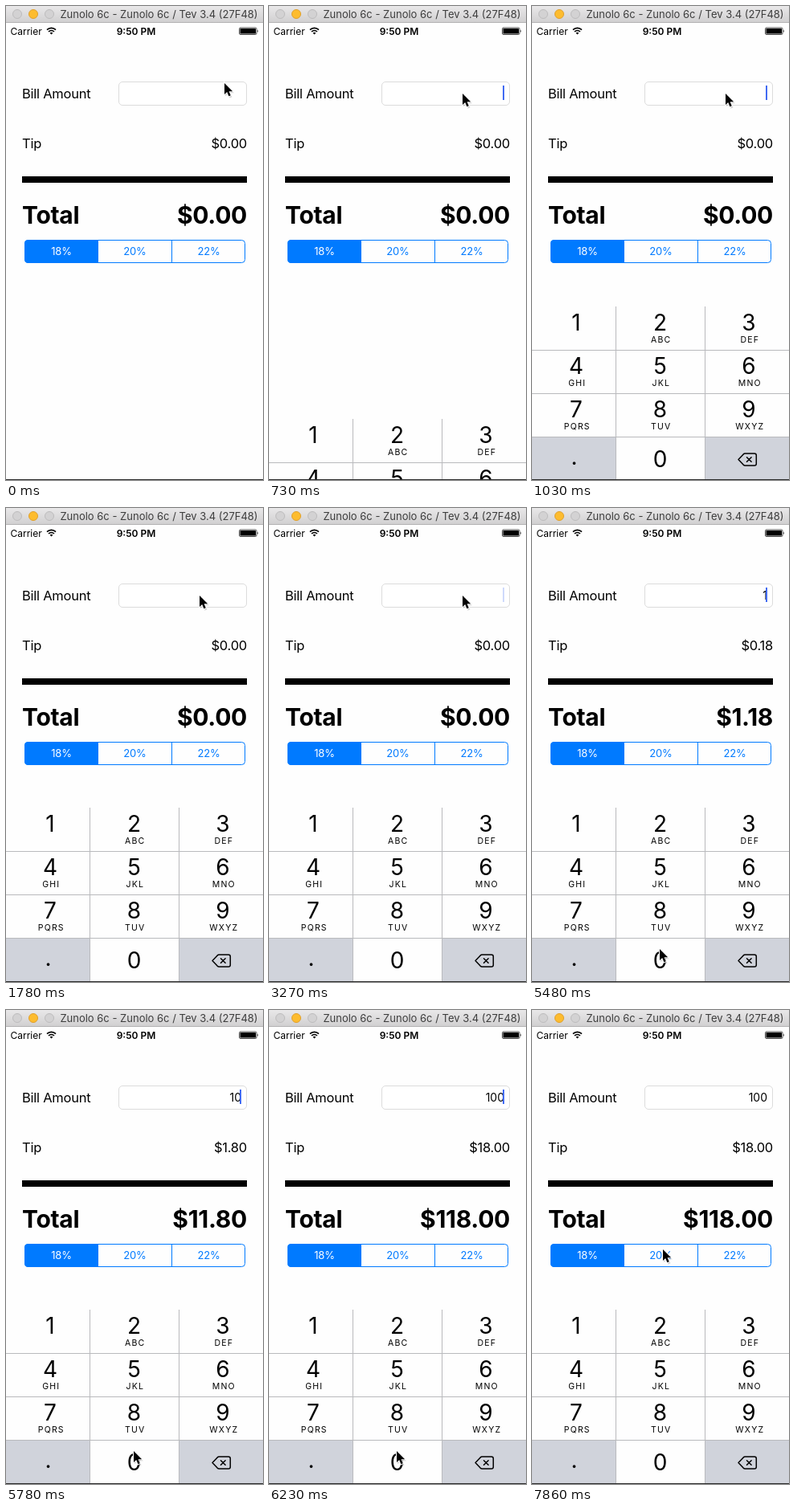
Animation of 320 by 590 pixels, one loop 8 s. Source, as an HTML page:

```html
<!DOCTYPE html>
<html lang="en">
<head>
<meta charset="utf-8">
<title>Tip calculator</title>
<style>
  html, body { margin: 0; width: 100%; height: 100%; overflow: hidden; background: #fefefe; }
  svg { display: block; width: 100vw; height: 100vh; font-family: Inter, "Open Sans", sans-serif; }
  .mid { text-anchor: middle; }
  .end { text-anchor: end; }
  .label { font-size: 16.5px; letter-spacing: -.25px; }
  .total { font-size: 30px; font-weight: 700; letter-spacing: -.3px; }
  .segment { font-size: 13px; letter-spacing: -.2px; fill: #007aff; }
  .digit { font-size: 28px; }
  .letters { font-size: 10.5px; letter-spacing: 1.2px; }
  .line { fill: none; stroke: #b9babd; }
</style>
</head>
<body>
<svg viewBox="0 0 320 590">
  <defs>
    <linearGradient id="chrome" x2="0" y2="1">
      <stop stop-color="#e9e8e9"/><stop offset="1" stop-color="#d1d0d1"/>
    </linearGradient>
    <clipPath id="screen"><path d="M0 21H320V589H0Z"/></clipPath>
  </defs>
  <rect width="320" height="590" fill="#fefefe"/>

  <!-- window bar -->
  <rect width="320" height="20" fill="url(#chrome)"/>
  <rect y="20" width="320" height="1" fill="#b3b2b3"/>
  <g fill="#d3d2d3" stroke="#bdbcbd">
    <circle cx="14" cy="10" r="5.5"/>
    <circle cx="34" cy="10" r="5.5" fill="#fdbc2f" stroke="#e0a02c"/>
    <circle cx="54" cy="10" r="5.5"/>
  </g>
  <text class="mid" x="190.5" y="15" font-size="13" fill="#3d3d3d">Zunolo 6c - Zunolo 6c / Tev 3.4 (27F48)</text>

  <!-- status bar -->
  <text x="5.5" y="35.5" font-size="12">Carrier</text>
  <g fill="none" stroke="#000" stroke-width="1.7">
    <path d="M51 29.7a7.8 7.8 0 0 1 11 0M53 32a5 5 0 0 1 7 0"/>
    <path d="M56.5 35.6l-1.9-2a2.7 2.7 0 0 1 3.8 0z" fill="#000" stroke="none"/>
  </g>
  <text class="mid" x="162" y="35.5" font-size="12" font-weight="600">9:50 PM</text>
  <rect x="290.5" y="27" width="21.5" height="8.5" rx="1.5" fill="none" stroke="#000" stroke-width=".7"/>
  <rect x="291.5" y="28" width="19.5" height="6.5" rx=".6"/>
  <path d="M313 29.5q1.6 1.7 0 3.5z"/>

  <!-- form -->
  <text class="label" x="20" y="114.5">Bill Amount</text>
  <rect x="140.5" y="94.5" width="159" height="29" rx="4.5" fill="#fff" stroke="#dcdcdc"/>
  <text class="end" id="bill" x="293" y="114" font-size="14"></text>
  <rect id="caret" x="291" y="99" width="2" height="18" fill="#426bf2"/>
  <text class="label" x="20" y="176.5">Tip</text>
  <text class="label end" id="tip" x="300" y="176.5"></text>
  <rect x="20" y="212" width="280" height="8"/>
  <text class="total" x="20" y="271">Total</text>
  <text class="total end" id="total" x="300" y="271"></text>
  <path d="M115 291H27.5a4.5 4.5 0 0 0-4.5 4.5v20a4.5 4.5 0 0 0 4.5 4.5H115z" fill="#007aff"/>
  <rect x="23.5" y="291.5" width="274" height="28" rx="4" fill="none" stroke="#007aff"/>
  <path d="M206.5 291V320" stroke="#007aff"/>
  <text class="segment mid" x="69" y="310" style="fill:#fff">18%</text>
  <text class="segment mid" x="160.5" y="310">20%</text>
  <text class="segment mid" x="252.5" y="310">22%</text>

  <g clip-path="url(#screen)">
    <g id="keyboard">
      <rect y="373" width="320" height="216" fill="#fefefe"/>
      <path d="M0 535.5H104.5V589H0zM215.5 535.5H320V589H215.5z" fill="#d0d3db"/>
      <rect id="press" fill="#d0d3db" height="54"/>
      <path class="line" d="M0 427.5H320M0 481.5H320M0 535.5H320M104.5 373V589M215.5 373V589"/>
      <g id="keys"></g>
      <g fill="none" stroke="#000" stroke-width="1.5" stroke-linejoin="round" stroke-linecap="round">
        <path d="M257 563.5l6.2-6.6q.9-.9 2-.9H277q2.3 0 2.3 2.3v10.4q0 2.3-2.3 2.3H265.200q-1.100 0-2-.9z"/>
        <path d="M267.500 560.700l5.600 5.600m0-5.600l-5.600 5.600"/>
      </g>
    </g>
  </g>
  <rect y="589" width="320" height="1" fill="#2a2a2a"/>

  <g id="mouse">
    <path d="M1 1.500V16l3.200-2.800 2.300 5.300 3-1.300-2.200-5H12z" fill="#000" opacity=".18"/>
    <path d="M0 0V14L3.200 11 5.400 16.200 7.800 15.200 5.600 10.200H10.200z" stroke="#fff" stroke-width="2" paint-order="stroke"/>
  </g>
</svg>
<script>
  const LOOP = 8000, TICK = 148.2, LAST = 53;
  const $ = id => document.getElementById(id);

  // Changes over time, counted in ticks.
  const mousePath = [
    [0, 272, 96], [3, 241, 109], [27, 241, 109], [29, 78, 319], [30, 78, 319],
    [32, 77, 393], [34, 77, 393], [37, 159, 549], [47, 159, 549], [53, 163, 298]
  ];
  const caretLevels = [
    [0, 0], [5, 1], [11, .5], [12, 0], [15, .5], [16, 1], [18, .5], [19, 0],
    [22, .25], [23, 1], [25, 0], [28, .5], [29, 1], [33, .5], [34, 0], [35, 1],
    [45, .5], [46, 0], [48, .5], [49, 1], [52, .5], [53, 0]
  ];
  const bills = [[0, ""], [35, "1"], [39, "10"], [42, "100"]];
  const presses = [[0, ""], [33, "1"], [35, ""], [38, "0"], [39, ""], [41, "0"], [42, ""]];
  const keyBoxes = { 1: [0, 373, 104.5], 0: [104.5, 535, 111] };

  const valueAt = (list, n) => list.findLast(([start]) => start <= n)[1];
  const smooth = u => u * u * (3 - 2 * u);

  function mouseAt(n) {
    const next = mousePath.findIndex(([start]) => start > n);
    if (next < 0) return mousePath.at(-1).slice(1);
    const [n0, x0, y0] = mousePath[next - 1], [n1, x1, y1] = mousePath[next];
    const u = smooth((n - n0) / (n1 - n0));
    return [x0 + (x1 - x0) * u, y0 + (y1 - y0) * u].map(Math.round);
  }

  // Critically damped slide from below the screen.
  function keyboardOffset(n) {
    const w = 3.08 * Math.max(0, n - 4.6);
    return Math.round(216 * (1 + w) * Math.exp(-w));
  }

  function buildKeys() {
    const columns = [55, 159.5, 270];
    const letters = ["", "ABC", "DEF", "GHI", "JKL", "MNO", "PQRS", "TUV", "WXYZ"];
    const text = (kind, x, y, s) => `<text class="${kind} mid" x="${x}" y="${y}">${s}</text>`;
    $("keys").innerHTML = letters.map((s, i) => {
      const x = columns[i % 3], y = 403 + 54 * Math.floor(i / 3);
      return text("digit", x, y, i + 1) + text("letters", x + 1.3, y + 15, s);
    }).join("") + text("digit", 52.5, 570, ".") + text("digit", 159.5, 572.5, "0");
  }

  function draw(now) {
    const n = Math.min(LAST, Math.floor((now % LOOP + 11) / TICK));
    const bill = valueAt(bills, n), tip = bill * .18;
    $("bill").textContent = bill;
    $("tip").textContent = "$" + tip.toFixed(2);
    $("total").textContent = "$" + (+bill + tip).toFixed(2);
    $("caret").setAttribute("opacity", valueAt(caretLevels, n));
    $("keyboard").setAttribute("transform", `translate(0 ${keyboardOffset(n)})`);
    $("mouse").setAttribute("transform", `translate(${mouseAt(n)})`);

    const [x, y, width] = keyBoxes[valueAt(presses, n)] || [0, 0, 0];
    $("press").setAttribute("x", x);
    $("press").setAttribute("y", y);
    $("press").setAttribute("width", width);
  }

  buildKeys();
  const start = performance.now();
  (function loop() {
    draw(performance.now() - start);
    requestAnimationFrame(loop);
  })();
</script>
</body>
</html>
```
